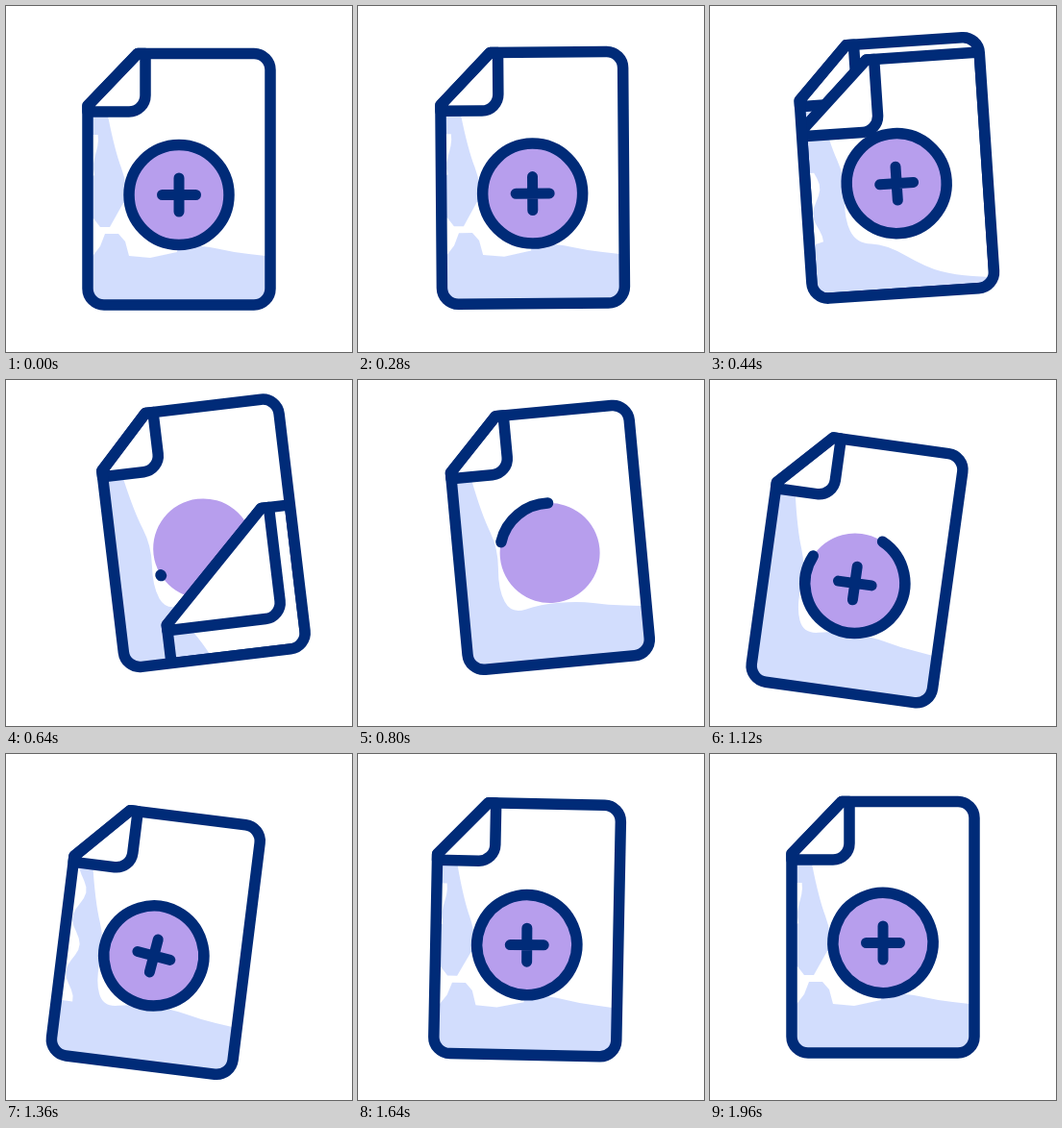
These frames come from a looping animation (360x360 px, 2 s). An HTML page with a canvas:

```html
<!DOCTYPE html>
<html lang="en">
<head>
<meta charset="utf-8">
<title>Add document</title>
<style>
html, body { margin: 0; width: 100%; height: 100%; overflow: hidden; background: #fff; }
canvas { display: block; width: 360px; height: 360px; }
</style>
</head>
<body>
<canvas id="stage"></canvas>
<script>
const NAVY = '#002b78', SHADE = '#d2ddfd', LILAC = '#b79eed';
const LOOP = 2000, STEP = 40, REST = 240;
const FLIP_START = 320, FLIP_END = 790;
const LEFT = 85, RIGHT = 275, TOP = 49.5, BOTTOM = 311;
const CX = 180, CY = 196.5, R = 52;
const RAD = Math.PI / 180;

const canvas = document.getElementById('stage');
const ratio = window.devicePixelRatio || 1;
canvas.width = canvas.height = 360 * ratio;
const ctx = canvas.getContext('2d');

const clamp = k => Math.min(1, Math.max(0, k));
const smooth = k => k * k * (3 - 2 * k);
const progress = (t, from, to) => clamp((t - from) / (to - from));
const ease = (t, from, to) => smooth(progress(t, from, to));

// Straight-line value at time t through [time, value] points.
function at(t, ...keys) {
  let value = keys[0][1];
  for (let i = 1; i < keys.length; i++) {
    value += (keys[i][1] - keys[i - 1][1]) * progress(t, keys[i - 1][0], keys[i][0]);
  }
  return value;
}

// Swing left, swing right, settle.
const tiltAt = t =>
  -6.8 * ease(t, 215, 630) + 14.7 * ease(t, 720, 1125) - 7.9 * ease(t, 1260, 1760);

function trace(points) {
  ctx.beginPath();
  for (const [x, y] of points) ctx.lineTo(x, y);
  ctx.closePath();
}

function fill(color) {
  ctx.fillStyle = color;
  ctx.fill();
}

function line(width = 11.5) {
  ctx.lineWidth = width;
  ctx.stroke();
}

function body() {
  ctx.beginPath();
  ctx.moveTo(LEFT, 103.5);
  ctx.lineTo(137, TOP);
  ctx.arcTo(RIGHT, TOP, RIGHT, BOTTOM, 17);
  ctx.arcTo(RIGHT, BOTTOM, LEFT, BOTTOM, 17);
  ctx.arcTo(LEFT, BOTTOM, LEFT, 103.5, 17);
  ctx.closePath();
}

// Tint down the left side and along the bottom; sag lowers its right part.
const EDGE = [[106, 114], [113, 150], [127, 187], [123, 229], [134, 256],
              [165, 249], [205, 249], [235, 256], [270, 260]];

function tint(sag) {
  const edge = EDGE.map(([x, y]) => [x, y + sag * 40 * clamp((x - 150) / 60)]);
  ctx.beginPath();
  ctx.moveTo(LEFT, 114);
  ctx.lineTo(...edge[0]);
  for (let i = 1; i < edge.length - 1; i++) {
    const [x, y] = edge[i], [nx, ny] = edge[i + 1];
    ctx.quadraticCurveTo(x, y, (x + nx) / 2, (y + ny) / 2);
  }
  ctx.lineTo(...edge[edge.length - 1]);
  ctx.lineTo(RIGHT, BOTTOM);
  ctx.lineTo(LEFT, BOTTOM);
  fill(SHADE);
}

// Uneven white strip along the left border.
function ragged(from, to, width) {
  const points = [[LEFT, to], [LEFT, from]];
  for (let y = from; y <= to; y += 6) {
    points.push([91 + width * (0.5 + 0.5 * Math.sin(y / 9 + 5)), y]);
  }
  trace(points);
  fill('#fff');
}

// White break between the side and bottom tint.
function gap() {
  trace([[88, 221], [91, 221], [98, 230], [108, 230], [122, 205], [180, 205], [178, 256],
         [150, 262], [128, 260], [124, 245], [117, 237], [103, 237], [98, 250], [88, 263]]);
  fill('#fff');
  ragged(134, 180, 5);
}

function badge(from, sweep, drop, spin) {
  ctx.beginPath();
  ctx.arc(CX, CY, R, 0, 7);
  fill(LILAC);

  ctx.save();
  ctx.clip();
  ctx.translate(CX, CY + drop);
  ctx.rotate(spin * RAD);
  ctx.beginPath();
  ctx.moveTo(-17.5, 0);
  ctx.lineTo(17.5, 0);
  ctx.moveTo(0, -17.5);
  ctx.lineTo(0, 17.5);
  line(11);
  ctx.restore();

  if (sweep > 0) {
    ctx.beginPath();
    ctx.arc(CX, CY, R, from * RAD, (from + sweep) * RAD);
    line();
  }
}

// Folded corner: left edge, top edge and the tip of the flap.
function flap(left, top, x, y) {
  ctx.beginPath();
  ctx.moveTo(left, y - 6);
  ctx.lineTo(x - 8, top);
  ctx.lineTo(x, top);
  ctx.arcTo(x, y, left, y, 17);
  ctx.lineTo(left, y);
  ctx.closePath();
  fill('#fff');
  line();
}

function oldFace(t) {
  tint(at(t, [300, 0], [440, 1], [640, 3.5]));
  if (t <= FLIP_START) gap();
  else if (t < 560) ragged(180, 256, 9);
  badge(0, 360, 0, 0);
}

function newFace(t) {
  tint(0);
  if (t >= 1500) gap();
  else if (t >= 1160) ragged(116, 254, 11);
  badge(
    at(t, [640, 154], [960, 242], [1240, 336]),
    at(t, [638, 0], [960, 149], [1240, 360]),
    at(t, [880, -80], [960, -41], [1100, 0]),
    90 * ease(t, 1295, 1660)
  );
}

function turningSheet(t) {
  const left = at(t, [440, LEFT], [640, 133], [FLIP_END, RIGHT]);
  const top = at(t, [FLIP_START, TOP], [440, 66], [640, 162], [FLIP_END, BOTTOM]);
  const k = at(t, [FLIP_START, 0], [440, 0.155], [640, 0.83], [690, 1]);
  const x = 145 + 130 * k, y = 110 + 201 * k;
  const cut = [[left, y - 6], [x - 8, top], [RIGHT, top], [RIGHT, BOTTOM], [left, BOTTOM]];

  ctx.save();
  body();
  ctx.clip();
  ctx.save();
  trace(cut);
  fill('#fff');
  ctx.clip();
  oldFace(t);
  ctx.restore();
  trace(cut);
  line();
  flap(left, top, x, y);
  ctx.restore();
}

function draw(t) {
  ctx.setTransform(ratio, 0, 0, ratio, 0, 0);
  ctx.fillStyle = '#fff';
  ctx.fillRect(0, 0, 360, 360);
  ctx.strokeStyle = NAVY;
  ctx.lineCap = ctx.lineJoin = 'round';

  const tilt = tiltAt(t);
  ctx.translate(CX - 3.7 * tilt, CY + (tilt < 0 ? 3.1 : 1.9) * tilt);
  ctx.rotate(tilt * RAD);
  ctx.translate(-CX, -CY);

  ctx.save();
  body();
  fill('#fff');
  ctx.clip();
  (t > FLIP_START ? newFace : oldFace)(t);
  ctx.restore();

  flap(LEFT, TOP, 145, 110);
  if (t > FLIP_START && t < FLIP_END) turningSheet(t);
  body();
  line();
}

function tick() {
  const t = performance.now() % LOOP;
  draw(t < REST ? 0 : Math.floor(t / STEP) * STEP);
  requestAnimationFrame(tick);
}
tick();
</script>
</body>
</html>
```
